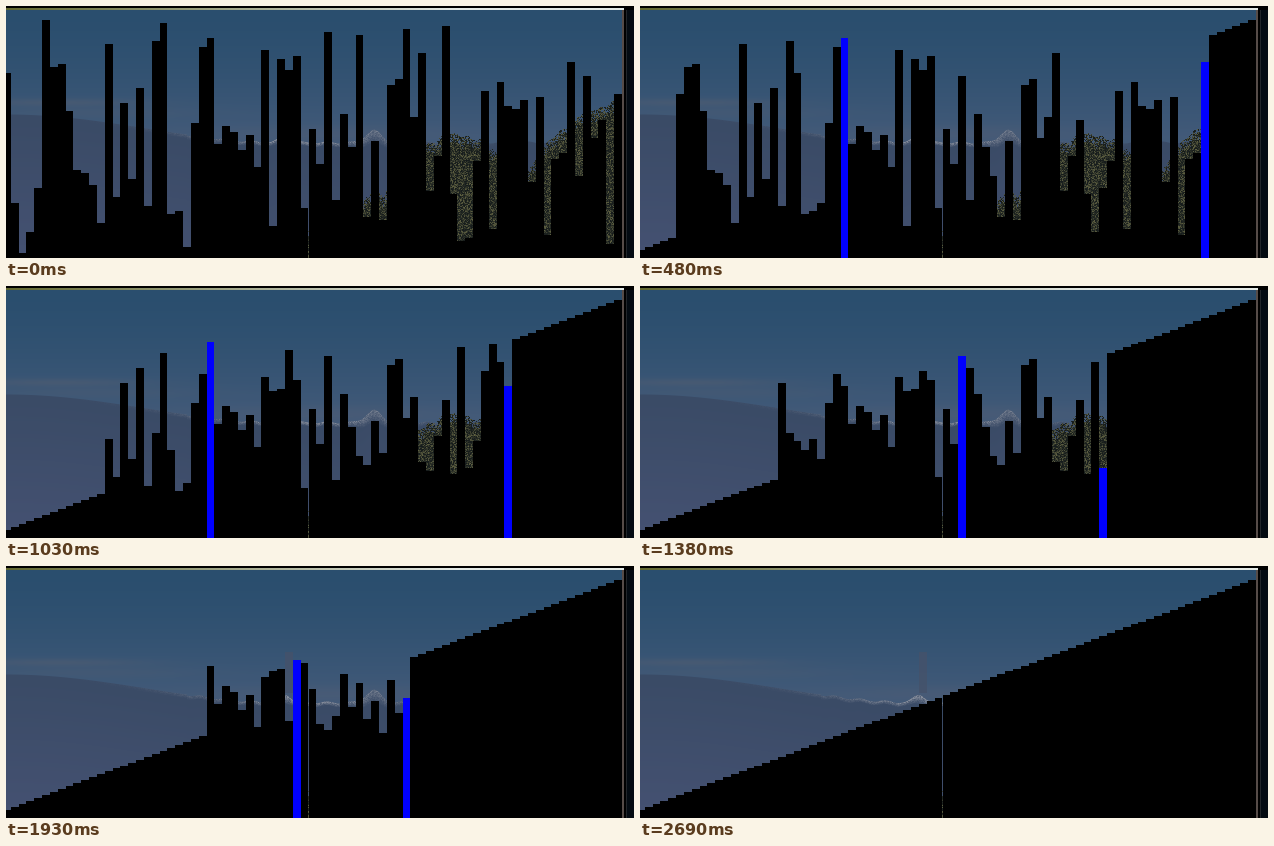
Animation, 628 px wide and 252 px high, one loop 3.22 s. Source, as a matplotlib script:

```python
import matplotlib.pyplot as plt
import numpy as np
from matplotlib.animation import FuncAnimation
from matplotlib.collections import PolyCollection

W, H, DPI = 628, 252, 100
TICK, LOOP = 10, 3220
RIGHT = 616  # right end of the wallpaper

# the shuffled input of the sort; every later state follows from it
START = [
    1, 61, 17, 0, 7, 22, 79, 63, 64, 48, 28, 27, 23, 10, 71, 19,
    51, 25, 56, 16, 72, 78, 13, 14, 2, 44, 70, 73, 37, 43, 41, 35,
    40, 29, 69, 9, 66, 62, 67, 15, 42, 30, 75, 18, 47, 36, 74, 12,
    38, 11, 57, 59, 76, 46, 68, 21, 33, 77, 20, 4, 5, 31, 55, 8,
    58, 50, 49, 52, 24, 53, 6, 32, 34, 65, 26, 60, 39, 45, 3, 54,
]
N = len(START)
STEPS = 38
SHORT = (6, 19, 27)  # steps held for 60 ms instead of 70
TIMES = np.cumsum([130] + [60 if k in SHORT else 70 for k in range(1, STEPS)])


def sort_states():
    """Double selection sort: list of (values, highlighted indices)."""
    a = list(START)
    states = []
    for lo in range(STEPS):
        hi = N - 1 - lo
        top = a.index(hi)
        states.append((a[:], {top, hi} if lo else set()))
        a[top], a[hi] = a[hi], a[top]
        low = a.index(lo)
        a[low], a[lo] = a[lo], a[low]
    states.append((sorted(a), set()))
    return states


def mix(a, b, t):
    """Blend colours (or images) a and b by weight t in 0..1."""
    t = np.clip(t, 0, 1)[..., None]
    return np.asarray(a, float) * (1 - t) + np.asarray(b, float) * t


def bump(d, width):
    return np.exp(-(d / width) ** 2)


def ridge_line(x):
    slope = 108 + 14 * (1 - np.cos(np.pi * np.clip(x / 280, 0, 1)))
    peaks = 8 * bump(x - 279, 8) + 12 * bump(x - 367, 11)
    return slope - peaks + np.sin(x / 4) * (x > 180)


def tree_line(x):
    small = 183 + .1 * (x - 368) ** 2
    middle = 128 + .012 * (x - 450) ** 2
    right = 96 + .0075 * (x - RIGHT) ** 2
    ground = np.where(x > 295, 225, H)
    line = np.minimum.reduce([small, middle, right, ground])
    return line + 3 * np.sin(x / 3) * np.sin(x / 7)


def wallpaper():
    rng = np.random.default_rng(5)
    y, x = np.mgrid[0:H, 0:W].astype(float)
    img = mix((42, 78, 110), (66, 90, 121), (y / 130) ** 1.5)

    # cloud bands and haze above the horizon
    cloud = bump(y - 96, 4) * bump(x - 50, 90) + .6 * bump(y - 106, 6) * bump(x - 90, 110)
    haze = .3 * bump(y - 127, 8) * bump(x - 320, 130)
    img = mix(img, (86, 94, 112), .45 * cloud + haze)

    # hazy mountains, snowy in the distance
    depth = y - ridge_line(x)
    rock = np.clip(depth + .5, 0, 1)
    img = mix(img, mix((58, 75, 102), (68, 81, 113), depth / 130), rock)
    thick = 4 + 9 * bump(x - 367, 14) + 5 * bump(x - 279, 8)
    snow = np.clip(1 - depth / thick, 0, 1) * rock * bump(x - 300, 110)
    img = mix(img, (158, 162, 172), snow * (.3 + .7 * rng.random((H, W))))

    # speckled foliage
    depth = y - tree_line(x)
    leaf = mix((22, 28, 28), (96, 97, 66), rng.random((H, W)) ** 2)
    cover = (depth > 0) & (rng.random((H, W)) < .5 + depth / 25)
    img[cover] = leaf[cover]

    # window borders
    img[:, RIGHT:] = 0
    img[4:, RIGHT + 4:] = (4, 11, 18)
    img[4:, RIGHT + 4] = (34, 38, 42)
    img[4:, RIGHT:RIGHT + 2] = (86, 76, 72)
    img[:2] = 0
    img[2:4, :RIGHT + 2] = mix((98, 104, 48), (226, 232, 228), x / 450)[2:4, :RIGHT + 2]
    return img.clip(0, 255).astype(np.uint8)


def box(i, top):
    left = np.floor(627 * i / N - 10.5)
    right = np.ceil(627 * (i + 1) / N - 11.5)
    return left, right, top


def rect(left, right, top, bottom=H):
    return [(left, top), (right, top), (right, bottom), (left, bottom)]


def bar(i, value):
    return rect(*box(i, round(246.6 - 2.94 * value)))


STATES = sort_states()

fig = plt.figure(figsize=(W / DPI, H / DPI), dpi=DPI, facecolor="black")
ax = fig.add_axes([0, 0, 1, 1])
ax.imshow(wallpaper(), extent=(0, W, H, 0), interpolation="nearest", aspect="auto")
ax.set_xlim(0, W)
ax.set_ylim(H, 0)
ax.axis("off")

# faint strip left behind by one of the tall bars
strip = PolyCollection([rect(*box(37, 86), 127)], facecolors="#45526a",
                       alpha=.8, linewidths=0)
bars = PolyCollection([bar(i, v) for i, v in enumerate(START)],
                      facecolors="black", linewidths=0)
ax.add_collection(strip, autolim=False)
ax.add_collection(bars, autolim=False)


def draw(frame):
    step = int(np.searchsorted(TIMES, frame * TICK, side="right"))
    values, marked = STATES[step]
    bars.set_verts([bar(i, v) for i, v in enumerate(values)])
    bars.set_facecolor(["blue" if i in marked else "black" for i in range(N)])
    strip.set_visible(step >= 25)
    return strip, bars


anim = FuncAnimation(fig, draw, frames=LOOP // TICK, interval=TICK,
                     repeat=True, repeat_delay=0, blit=False)
plt.show()
```
